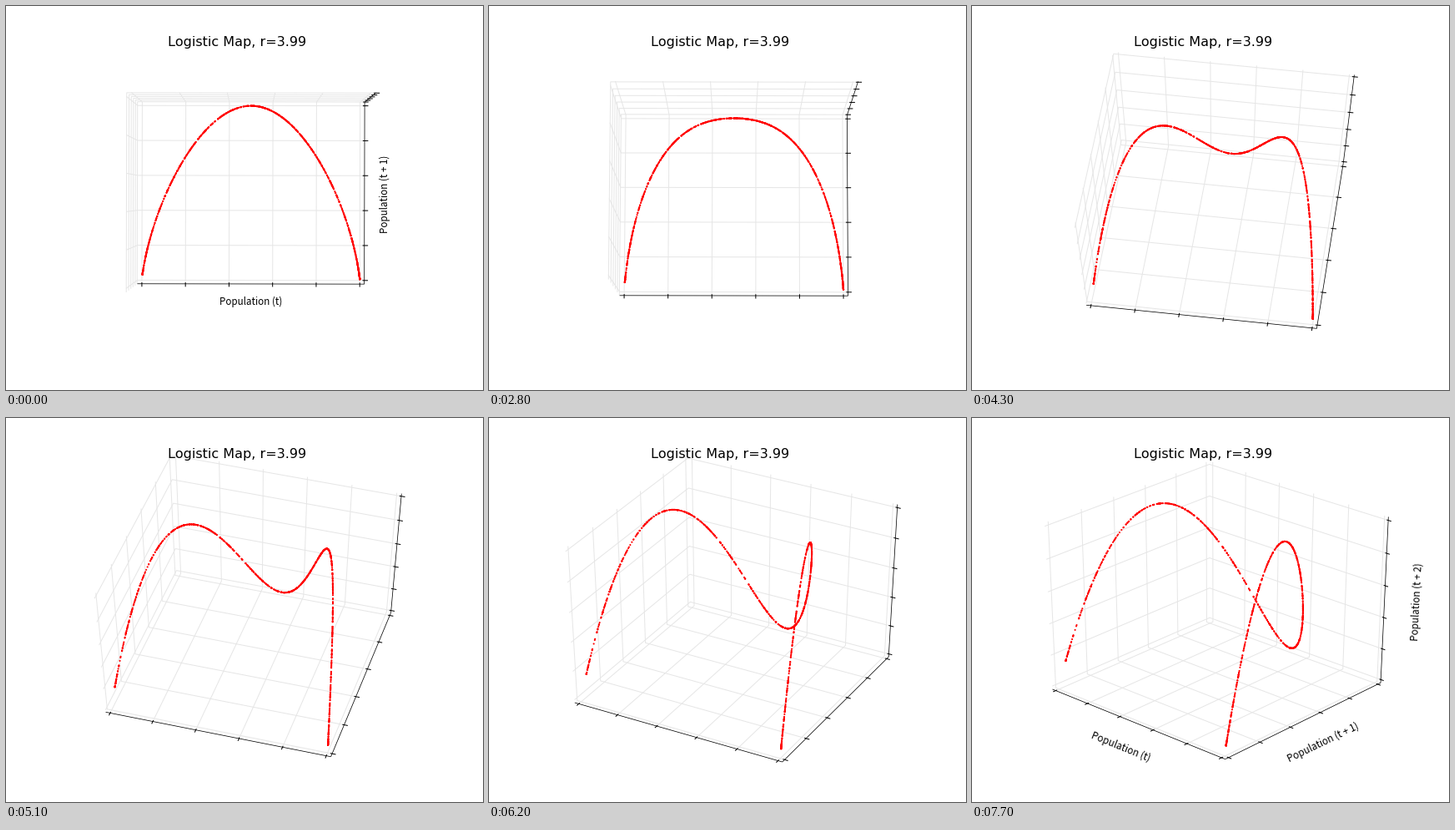
Animation, 572 px wide and 460 px high, one loop 10 s. Source, as a matplotlib script:

```python
import numpy as np
import matplotlib.pyplot as plt
from matplotlib.animation import FuncAnimation
from matplotlib.collections import LineCollection

plt.rcParams["text.kerning_factor"] = 6

W, H, DPI = 572, 460, 80
PX = 72 / DPI                       # points per pixel
CENTER = np.array([293.8, 223.8])   # screen place of the cube's middle
SCALE = np.array([3010.0, -2410.0])
DIST = 11.0
LO, HI = -1 / 48, 49 / 48           # pane edges around the 0..1 cube
TICKS = np.linspace(0, 1, 6)
TICK_IN, TICK_OUT = 0.1 / 12, 0.2 / 12

# camera phases: frames, elevation drop per frame, azimuth gain per frame
PHASES = np.array([
    (20, 0, 0), (3, 0.5, 0), (14, 1, 0), (24, 1.5, 1.1),
    (4, 1, 1.1), (9, 0.5, 1.1), (3, 0.2, 0.5), (23, 0, 0),
])
counts = PHASES[:, 0].astype(int)
ELEV = 89.9 - np.cumsum(np.repeat(PHASES[:, 1], counts))
AZIM = 270.1 + np.cumsum(np.repeat(PHASES[:, 2], counts))
FRAMES = counts.sum()
MOVE_START, MOVE_END = counts[0], FRAMES - counts[-1]


def project(points, elev, azim):
    e, a = np.radians([elev, azim])
    right = np.array([-np.sin(a), np.cos(a), 0])
    up = np.array([-np.cos(a) * np.sin(e), -np.sin(a) * np.sin(e), np.cos(e)])
    toward = np.array([np.cos(a) * np.cos(e), np.sin(a) * np.cos(e), np.sin(e)])
    rel = np.asarray(points) - 0.5
    depth = DIST - rel @ toward
    flat = np.stack([rel @ right, rel @ up], axis=-1)
    return CENTER + SCALE * flat / depth[..., None]


def logistic(rate, pop, count):
    pops = [pop]
    while len(pops) < count:
        pops.append(pops[-1] * rate * (1 - pops[-1]))
    return np.array(pops)


def grid_lines():
    lines = []
    for t in TICKS:
        lines.append([(t, LO, LO), (t, HI, LO), (t, HI, HI)])
        lines.append([(HI, t, LO), (LO, t, LO), (LO, t, HI)])
        lines.append([(HI, HI, t), (LO, HI, t), (LO, LO, t)])
    return np.array(lines)


def tick_lines():
    lines = []
    left, right = HI - TICK_IN, HI + TICK_OUT
    for t in TICKS:
        lines.append([(t, LO + TICK_IN, LO), (t, LO - TICK_OUT, LO)])
        lines.append([(left, t, LO), (right, t, LO)])
        lines.append([(left, HI, t), (right, HI, t)])
    return np.array(lines)


GRID = grid_lines()
MARKS = tick_lines()
AXES = np.array([
    [(LO, LO, LO), (HI, LO, LO)],
    [(HI, LO, LO), (HI, HI, LO)],
    [(HI, HI, LO), (HI, HI, HI)],
])
pops = logistic(3.99, 0.5, 1000)
POINTS = np.column_stack([pops[:-2], pops[1:-1], pops[2:]])

fig = plt.figure(figsize=(W / DPI, H / DPI), dpi=DPI, facecolor="white")
ax = fig.add_axes([0, 0, 1, 1])
ax.set_xlim(0, W)
ax.set_ylim(H, 0)
ax.axis("off")


def add_lines(color, width, order):
    lines = LineCollection([], colors=color, linewidths=width * PX, zorder=order)
    return ax.add_collection(lines, autolim=False)


def add_label(text, x, y, angle):
    return ax.text(x, y, text, rotation=angle, ha="center", va="center",
                   family="Noto Sans CJK JP", size=11.6 * PX, zorder=5)


grid = add_lines("#e6e6e6", 1.0, 1)
edges = add_lines("black", 0.75, 2)
marks = add_lines("black", 1.0, 3)
# one colour per dot keeps the dots off the whole-pixel marker path
dots = ax.scatter(*project(POINTS, ELEV[0], AZIM[0]).T, s=(2.1 * PX) ** 2,
                  c=["red"] * len(POINTS), linewidths=0, zorder=4)
ax.text(277, 48, "Logistic Map, r=3.99", family="DejaVu Sans", size=16 * PX,
        ha="center", va="baseline", zorder=6)

start_labels = [
    add_label("Population (t)", 293.3, 354, 0),
    add_label("Population (t + 1)", 454.5, 225.5, 90),
]
end_labels = [
    add_label("Population (t)", 178.5, 394.5, -22.2),
    add_label("Population (t + 1)", 421.5, 388.5, 25.7),
    add_label("Population (t + 2)", 533.5, 220, 87.1),
]


def draw(n):
    view = ELEV[n], AZIM[n]
    for lines, shape in ((grid, GRID), (edges, AXES), (marks, MARKS)):
        lines.set_segments(project(shape, *view))
    dots.set_offsets(project(POINTS, *view))
    for label in start_labels:
        label.set_visible(n < MOVE_START)
    for label in end_labels:
        label.set_visible(n >= MOVE_END)
    return [grid, edges, marks, dots, *start_labels, *end_labels]


anim = FuncAnimation(fig, draw, frames=int(FRAMES), interval=100,
                     repeat=True, repeat_delay=0)
plt.show()
```
